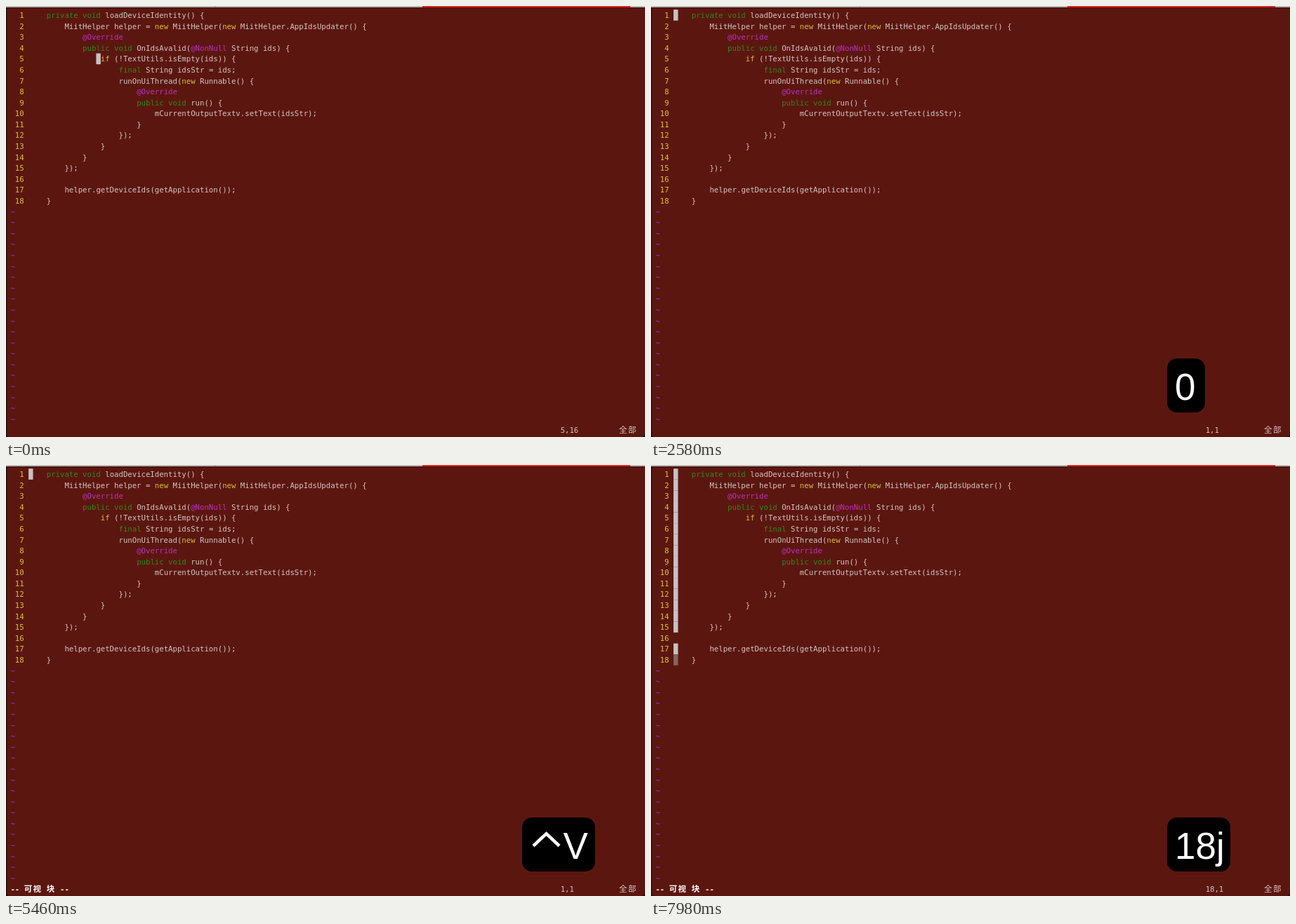
Write an HTML page that moves like this. It is 910x615 px and loops after 8000 ms.

```html
<!DOCTYPE html>
<html lang="zh">
<head>
<meta charset="utf-8">
<style>
  html, body { margin: 0; width: 100%; height: 100%; overflow: hidden; background: #5c1610; }
  svg { display: block; width: 910px; height: 615px; }
  .mono { font: 10.66px "DejaVu Sans Mono", monospace; }
  .cjk { font: 11.5px "Noto Sans CJK SC", "Noto Sans CJK", sans-serif; }
  .bold { font-weight: bold; }
  .key { font: 53px "Liberation Sans", sans-serif; }
</style>
</head>
<body>
<svg id="stage" viewBox="0 0 910 615"></svg>
<script>
const LOOP = 8000, STEP = 60;
const CELL = 6.42, LEFT = 6.4, ROW = 15.59, GUTTER = 4;
const HOLD = 1800, FADE = 180;
const INK = { text: '#d2c6c2', keyword: '#d6c22e', type: '#2c8a16', note: '#bd2fbd',
              number: '#dcc62c', tilde: '#7048d4', block: '#c6c2c2' };

const code = `    private void loadDeviceIdentity() {
        MiitHelper helper = new MiitHelper(new MiitHelper.AppIdsUpdater() {
            @Override
            public void OnIdsAvalid(@NonNull String ids) {
                if (!TextUtils.isEmpty(ids)) {
                    final String idsStr = ids;
                    runOnUiThread(new Runnable() {
                        @Override
                        public void run() {
                            mCurrentOutputTextv.setText(idsStr);
                        }
                    });
                }
            }
        });

        helper.getDeviceIds(getApplication());
    }`.split('\n');

const stage = document.getElementById('stage');

function add(tag, attrs, parent = stage, text = '') {
  const el = document.createElementNS('http://www.w3.org/2000/svg', tag);
  for (const k in attrs) el.setAttribute(k, attrs[k]);
  el.textContent = text;
  parent.appendChild(el);
  return el;
}

const colX = c => LEFT + c * CELL;
const rowY = r => 5.2 + r * ROW;
const rect = (x, y, width, height, fill, parent) => add('rect', { x, y, width, height, fill }, parent);
const put = (row, col, text, fill, cls = 'mono', parent) =>
  add('text', { x: colX(col), y: rowY(row) + 11.8, fill, class: cls }, parent, text);
const block = (row, col, fill, parent) => rect(colX(col), rowY(row), CELL, ROW, fill, parent);
const show = (el, on) => el.setAttribute('visibility', on ? 'visible' : 'hidden');

function tokenColor(word) {
  if (word[0] === '@') return INK.note;
  if (/^(private|public|void|final)$/.test(word)) return INK.type;
  if (/^(new|if)$/.test(word)) return INK.keyword;
  return INK.text;
}

// Window frame
rect(0, 0, 910, 615, '#5c1610');
rect(0, 0, 910, 2, '#bcb6b4');
rect(297, 0, 1, 2, '#98908e');
rect(593, 0, 296, 2, '#e8281c');
rect(0, 2, 910, 1, '#36100c');
rect(0, 2, 1.5, 613, '#24100e');
add('path', { d: 'M0 609Q1 615 6 615H0ZM910 609Q909 615 904 615H910Z', fill: '#24100e' });

// Selection lies below the text
const selection = add('g', {});
code.forEach((line, r) => { if (line && r < 17) block(r, GUTTER, INK.block, selection); });
block(17, GUTTER, '#806764', selection);

code.forEach((line, r) => {
  const n = String(r + 1);
  put(r, 3 - n.length, n, INK.number);
  for (const m of line.matchAll(/@?\w+|[^\w\s@]+/g))
    put(r, GUTTER + m.index, m[0], tokenColor(m[0]));
});
for (let r = code.length; r < 38; r++) put(r, 0, '~', INK.tilde);

// Cursor positions
const cursors = [add('g', {}), add('g', {}), add('g', {})];
block(4, GUTTER + 15, INK.block, cursors[0]);
block(0, GUTTER + 4, '#ffffff', cursors[1]);
put(0, GUTTER + 4, 'p', '#200808', 'mono', cursors[1]);
block(0, GUTTER, INK.block, cursors[2]);

// Status line
const position = put(38, 122, '', INK.text);
[...'全部'].forEach((ch, i) => put(38, 135 + 2 * i, ch, INK.text, 'cjk'));
const mode = add('g', {});
put(38, 0, '--', '#fff', 'mono bold', mode);
put(38, 11, '--', '#fff', 'mono bold', mode);
[['可', 3], ['视', 5], ['块', 8]].forEach(([ch, c]) => put(38, c, ch, '#fff', 'cjk bold', mode));

// Keystroke bubble
const bubble = add('g', {});
const plate = add('rect', { x: 735, y: 503, width: 54, height: 77, rx: 14, fill: '#000' }, bubble);
const label = add('text', { x: 746, y: 562, fill: '#fff', class: 'key' }, bubble);
const caret = add('path', { d: 'M751 543.5L769.5 526L788 543.5', fill: 'none', stroke: '#fff', 'stroke-width': 4.5 }, bubble);

const keys = [
  { at: 360, text: 'g', width: 54 },
  { at: 500, text: 'gg', width: 82 },
  { at: 2300, text: '0', width: 54 },
  { at: 4960, text: 'V', width: 104, ctrl: true },
  { at: 7600, text: '1', width: 54 },
  { at: 7730, text: '18', width: 82 },
  { at: 7880, text: '18j', width: 90 }
];

function drawKey(t) {
  const key = keys.filter(k => k.at <= t).pop();
  const age = key ? t - key.at : Infinity;
  const alpha = Math.max(0, Math.min(1, 1 - (age - HOLD) / FADE));
  bubble.setAttribute('opacity', alpha);
  show(bubble, alpha > 0);
  if (!alpha) return;
  plate.setAttribute('width', key.width);
  label.setAttribute('x', key.ctrl ? 793.5 : 746);
  label.textContent = key.text;
  caret.setAttribute('display', key.ctrl ? 'inline' : 'none');
}

function draw(time) {
  const t = Math.floor(time % LOOP / STEP) * STEP;
  const jumped = t >= 7880;
  const stop = t < 500 ? 0 : t < 2300 ? 1 : 2;
  cursors.forEach((c, i) => show(c, i === stop && !jumped));
  show(selection, jumped);
  show(mode, t >= 4960);
  position.textContent = jumped ? '18,1' : ['5,16', '1,5', '1,1'][stop];
  drawKey(t);
}

const start = performance.now();
function tick() {
  draw(performance.now() - start);
  requestAnimationFrame(tick);
}
tick();
</script>
</body>
</html>
```
